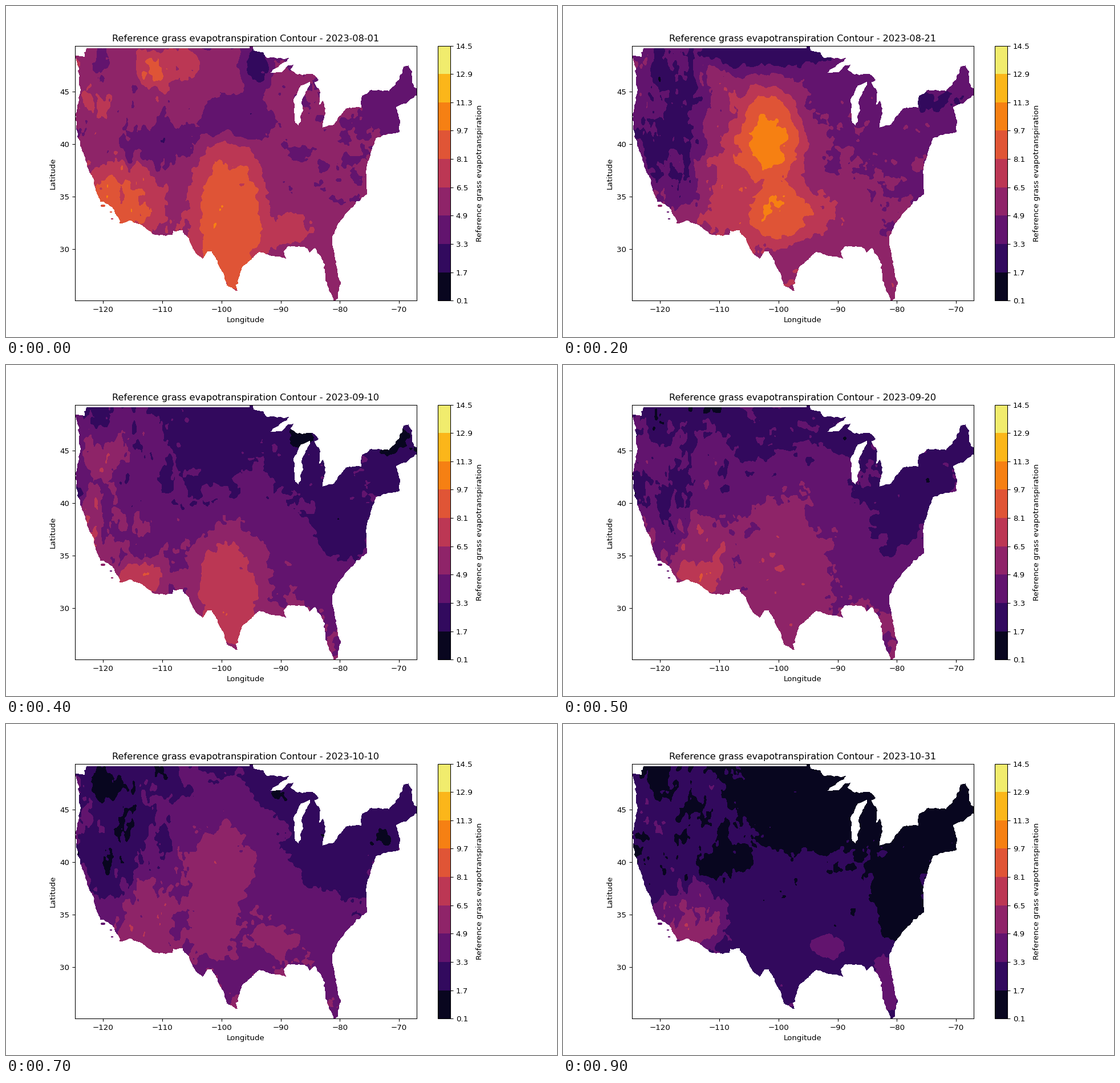
Recreate the animation shown at these times as a matplotlib script. Size 966 px wide and 580 px high, loop 1 s.

```python
import numpy as np
import matplotlib.pyplot as plt
from matplotlib.animation import FuncAnimation
from matplotlib.colors import BoundaryNorm, ListedColormap
from matplotlib.path import Path

# Map geometry is in stage pixels, y down.
WIDTH, HEIGHT, DPI = 966, 580, 96
LEFT, TOP, COLS, ROWS = 121, 70, 599, 447
LON, LAT = (-124.767, -67.058), (25.067, 49.4)
DATES = ("08-01", "08-11", "08-21", "08-31", "09-10",
         "09-20", "09-30", "10-10", "10-20", "10-31")
LEVELS = np.linspace(0.1, 14.5, 10)
STEP = LEVELS[1] - LEVELS[0]
LABEL = "Reference grass evapotranspiration"

# Corner points of the outline, clockwise; noise roughens it later.
north = [
    (121, 87), (137, 91), (141, 75), (427, 75), (428, 69), (432, 69), (434, 79),
    (451, 83), (459, 91), (498, 93), (463, 118), (484, 116), (494, 107), (504, 104),
    (498, 113), (511, 119), (535, 119), (550, 131), (540, 134), (551, 150), (548, 175),
    (556, 167), (560, 189), (554, 213), (574, 209), (596, 181), (622, 178), (624, 159),
    (642, 149), (672, 149), (686, 132), (697, 106)]
atlantic = [
    (707, 105), (713, 136), (720, 146), (720, 157), (684, 180), (690, 203), (690, 219),
    (649, 234), (637, 270), (630, 298), (633, 330), (604, 355), (584, 381), (573, 403),
    (573, 428), (586, 484), (582, 513), (574, 518), (560, 482)]
gulf = [
    (555, 447), (543, 426), (534, 433), (526, 423), (494, 421), (487, 432), (491, 444),
    (465, 439), (444, 431), (414, 458), (405, 488), (407, 501), (387, 491), (378, 464),
    (361, 432), (352, 431), (344, 445), (331, 432), (310, 394), (294, 394), (293, 402),
    (262, 402), (222, 377)]
pacific = [
    (200, 380), (186, 353), (166, 344), (143, 284), (130, 246), (123, 215), (122, 190),
    (129, 150), (129, 125)]
lake = [
    (533, 134), (516, 141), (505, 165), (507, 206), (512, 211), (522, 185), (519, 168),
    (527, 147)]

# Each mapped day: (mean, eastward slope, southward slope) in colour bands,
# then weather systems as (x, y, x radius, y radius, strength).
WEATHER = {
    0: ((3.4, -.5, .3), [
        (392, 375, 64, 155, 2.1), (400, 205, 60, 45, -1.3), (440, 108, 25, 45, -1.4),
        (265, 245, 75, 45, -1.1), (285, 105, 60, 35, 1.4), (205, 345, 70, 65, 1.4),
        (500, 390, 60, 35, .8)]),
    2: ((3.2, -.4, .7), [
        (195, 230, 65, 150, -1.6), (365, 225, 55, 80, 2), (330, 270, 100, 150, 1.2),
        (388, 365, 60, 50, 1.6), (340, 85, 130, 30, -1.2), (640, 165, 60, 25, -.7),
        (470, 360, 50, 50, .6)]),
    3: ((3.4, -.6, .4), [
        (145, 125, 45, 75, -2.6), (230, 150, 75, 60, -1), (215, 320, 65, 75, 2.5),
        (368, 235, 33, 90, 1.1), (390, 290, 70, 190, .9), (285, 330, 35, 50, -1),
        (618, 322, 30, 32, -2.1)]),
    4: ((2.5, -.5, .9), [
        (180, 140, 45, 55, .9), (390, 380, 65, 110, 1.5), (350, 180, 60, 90, -.5),
        (514, 130, 28, 22, -1), (587, 290, 50, 60, -.8), (240, 372, 45, 30, 1.5),
        (150, 270, 18, 60, 1.5), (675, 135, 45, 30, -.6)]),
    6: ((2.6, -.1, .7), [
        (180, 205, 52, 120, -1.6), (250, 90, 50, 40, -1.5), (250, 330, 50, 80, 1.9),
        (390, 250, 55, 60, .9), (385, 270, 105, 130, .8), (485, 130, 30, 25, -1),
        (655, 208, 28, 22, -1.4), (595, 235, 75, 95, -.7)]),
    8: ((2.2, -.5, .7), [
        (170, 100, 40, 30, -.9), (220, 210, 85, 125, -.7), (365, 190, 75, 110, 1),
        (365, 345, 45, 60, 1), (470, 380, 50, 30, 1), (540, 220, 38, 75, -.9),
        (470, 110, 60, 30, -.6), (670, 180, 20, 45, -.5)]),
    9: ((1.3, -.3, .5), [
        (420, 140, 140, 95, -.4), (280, 245, 50, 35, -.6), (590, 310, 45, 75, -.6),
        (225, 345, 65, 60, 1.6), (465, 390, 35, 25, .9), (567, 455, 25, 60, .8),
        (620, 180, 90, 60, -.3)]),
}

X, Y = np.meshgrid(LEFT + np.arange(COLS) + 0.5, TOP + np.arange(ROWS) + 0.5)


def noise(seed, falloff=0.8, stretch=1.0):
    """Fractal noise of unit spread; stretch lengthens it north to south."""
    rng = np.random.default_rng(seed)
    ky = np.fft.fftfreq(ROWS)[:, None] * stretch
    kx = np.fft.rfftfreq(COLS)[None, :]
    k2 = kx ** 2 + ky ** 2
    gain = (k2 + 0.015 ** 2) ** -falloff * np.exp(-k2 / 0.15 ** 2)
    spectrum = np.fft.rfft2(rng.standard_normal((ROWS, COLS)))
    field = np.fft.irfft2(spectrum * gain, s=(ROWS, COLS))
    return (field - field.mean()) / field.std()


def land_mask():
    # Only the natural coast is roughened, not the straight northern border.
    rough = 0.9 * (Y > 82)
    points = np.column_stack([
        (X + rough * noise(1, 0.5)).ravel(), (Y + rough * noise(2, 0.5)).ravel()])

    def inside(outline):
        return Path(outline).contains_points(points).reshape(X.shape)

    land = inside(north + atlantic + gulf + pacific) & ~inside(lake)
    for cx, cy, radius in ((170, 351, 4), (184, 362, 2), (186, 374, 2)):
        land |= np.hypot(X - cx, (Y - cy) * 1.6) < radius
    return land


def weather_field(trend, systems):
    mean, east, south = trend
    field = mean + east * (X - 420) / 300 + south * (Y - 293) / 220
    for cx, cy, rx, ry, strength in systems:
        d2 = ((X - cx) / rx) ** 2 + ((Y - cy) / ry) ** 2
        field += strength * np.exp(-d2 ** 2)
    return field


def build_fields():
    base = {i: weather_field(*day) for i, day in WEATHER.items()}
    for i in set(range(len(DATES))) - set(WEATHER):
        base[i] = (base[i - 1] + base[i + 1]) / 2
    sea = ~land_mask()
    west = 1 / (1 + np.exp((X - 310) / 25))
    terrain = west * noise(7, 0.65, stretch=1.8)
    fields = []
    for i in range(len(DATES)):
        bands = base[i] + 0.15 * noise(20 + i) + 0.3 * terrain
        value = LEVELS[0] + STEP * np.clip(bands, 0.02, 8.9)
        fields.append(np.ma.masked_where(sea, value))
    return fields


fields = build_fields()
cmap = ListedColormap(plt.get_cmap("inferno")((np.arange(9) + 0.5) / 9))

plt.rcParams["font.size"] = 10.06
fig, ax = plt.subplots(figsize=(WIDTH / DPI, HEIGHT / DPI), dpi=DPI)
image = ax.imshow(fields[0], cmap=cmap, norm=BoundaryNorm(LEVELS, 9),
                  extent=(*LON, *LAT), aspect="auto", interpolation="nearest")
colorbar = fig.colorbar(image, ax=ax, ticks=LEVELS, format="%.1f", label=LABEL)
colorbar.minorticks_off()
ax.set_xticks(range(-120, -69, 10))
ax.set_yticks(range(30, 46, 5))
ax.set_xlabel("Longitude")
ax.set_ylabel("Latitude")
title = ax.set_title("")


def update(i):
    image.set_data(fields[i])
    title.set_text(f"{LABEL} Contour - 2023-{DATES[i]}")
    return image, title


animation = FuncAnimation(fig, update, frames=len(DATES), interval=100, repeat=True)
plt.show()
```
